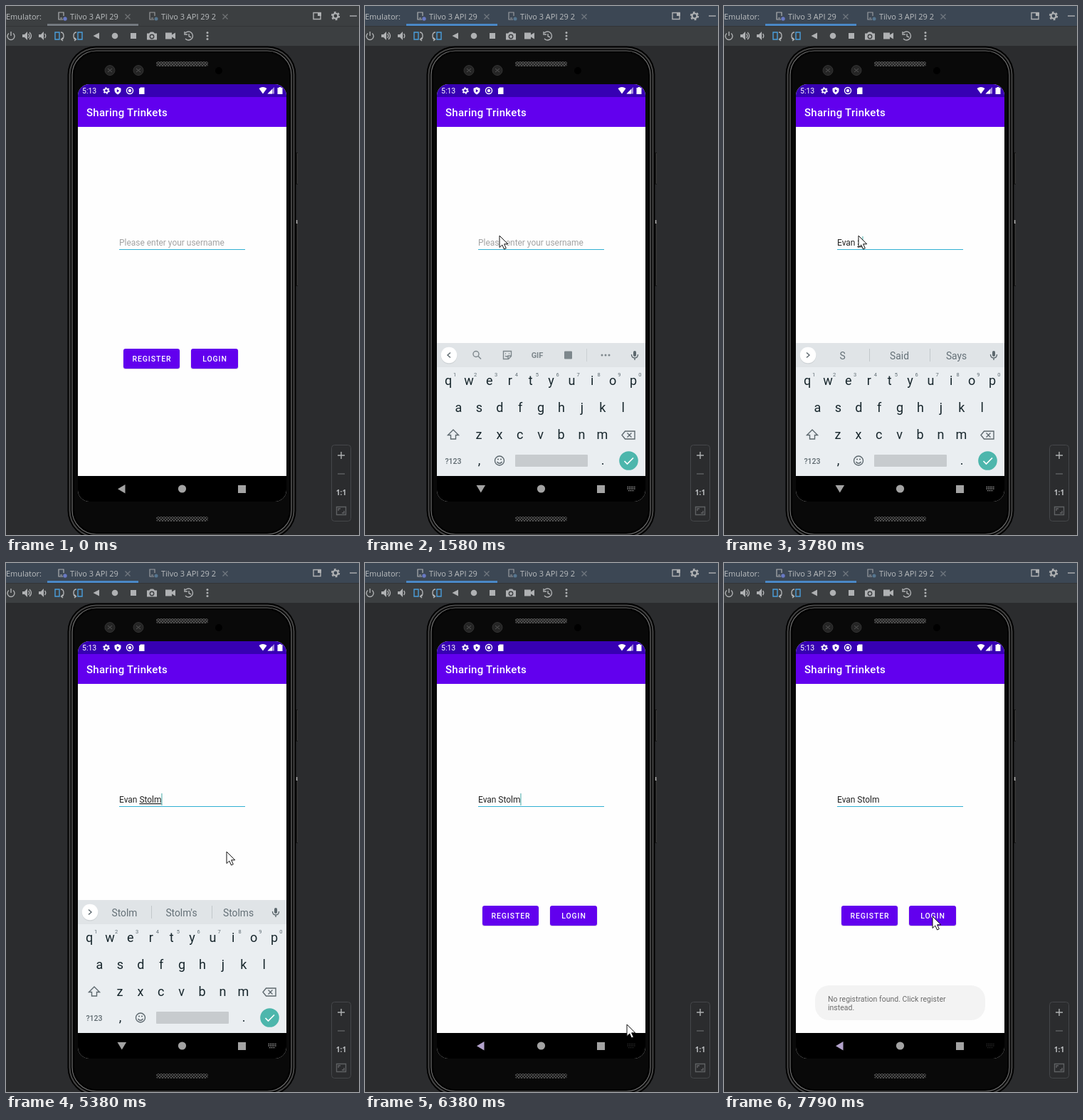
An HTML page that plays this animation: 496x744 px, repeating every 7990 ms.

```html
<!DOCTYPE html>
<html lang="en">
<head>
<meta charset="utf-8">
<title>Emulator login</title>
<style>
html, body { margin: 0; width: 100%; height: 100%; overflow: hidden; background: #2b2c2e; }
svg { display: block; width: 496px; height: 744px; font-family: Roboto, sans-serif; }
text { white-space: pre; }
.ide { font: 11px "Open Sans", sans-serif; fill: #bbbec0; }
.line { fill: none; stroke: currentColor; stroke-width: 1.4; }
.mid { text-anchor: middle; }
.button { font-size: 10.46px; font-weight: 500; letter-spacing: .93px; fill: #fff; }
.field { font-size: 11.95px; }
.key { font-size: 18px; fill: #17262c; }
.hint { font-size: 7.5px; fill: #5f6c73; }
.word { font-size: 13.8px; fill: #647077; }
</style>
</head>
<body>
<svg viewBox="0 0 496 744">
  <defs>
    <clipPath id="screen"><rect x="101" y="110" width="293" height="587" rx="16"/></clipPath>
    <pattern id="mesh" width="4" height="4" patternUnits="userSpaceOnUse">
      <path d="M0 0 4 4M4 0 0 4" stroke="#555" stroke-width=".9"/>
    </pattern>
    <g id="gear" fill="none" stroke="currentColor">
      <circle r="3.5" stroke-width="2.2"/><circle r="5.2" stroke-width="2" stroke-dasharray="2.7 2.74"/>
    </g>
    <g id="device" class="line">
      <path d="M2 5H-4V-5H3V0" stroke-width="1.2"/><path d="M-2 3H1" stroke-width="1"/>
    </g>
    <path id="close" class="line" d="M-3.5-3.5 3.5 3.5M3.5-3.5-3.5 3.5" stroke-width="1"/>
    <path id="speaker" d="M-6-2h3l4-4V6L-3 2h-3z" fill="currentColor"/>
    <g id="turn" class="line">
      <path d="M-6-5H0V5H-6Z" stroke="#4a9fdc"/><path d="M2-5Q6-5 6 0T3 5M5 2.500 2.500 5 5 7"/>
    </g>
    <g id="mic"><rect x="-2" y="-6" width="4" height="8" rx="2" fill="currentColor"/><path class="line" d="M-4.500-1Q-4.500 4 0 4T4.500-1M0 4V7"/></g>
  </defs>

  <rect width="496" height="744" fill="#2b2c2e"/>
  <rect width="496" height="56" fill="#3c3f41"/>
  <rect id="header" width="496" height="28"/>
  <path d="M0 28.500H496" stroke="#323436"/>
  <rect id="tabline" x="58" y="25" width="128" height="3"/>
  <g color="#afb1b3">
    <text class="ide" x="0" y="18.500">Emulator:</text>
    <use href="#device" x="78" y="14"/><circle cx="83" cy="18" r="2.700" fill="#6879c4"/>
    <text class="ide" x="90" y="18.500">Tilvo 3 API 29</text>
    <use href="#close" x="171" y="15" opacity=".45"/>
    <use href="#device" x="206" y="14" opacity=".8"/><circle cx="211" cy="18" r="2.500" fill="#567690"/>
    <text class="ide" x="218" y="18.500">Tilvo 3 API 29 2</text>
    <use href="#close" x="308" y="15" opacity=".45"/>
    <path class="line" d="M432 9.500h10v9h-10z"/><path d="M438 9h5v5h-5z" fill="currentColor"/>
    <use href="#gear" x="463" y="14"/>
    <path d="M483 14h10" class="line"/>

    <path class="line" d="M4 38.500A5 5 0 1 0 10 38.500M7 36V42"/>
    <use href="#speaker" x="29" y="42"/>
    <path class="line" d="M31.500 39Q34 42 31.500 45M33 37Q38 42 33 47"/>
    <use href="#speaker" x="52" y="42"/><path class="line" d="M54.500 39Q57 42 54.500 45"/>
    <use href="#turn" x="75" y="42"/>
    <use href="#turn" transform="translate(101 42) scale(-1 1)"/>
    <path d="M131 37.500V46.500L122.500 42Z" fill="currentColor"/>
    <circle cx="153" cy="42" r="4.300" fill="currentColor"/>
    <path d="M175 38h8v8h-8z" fill="currentColor"/>
    <path d="M198 38.500h3l2-2h4l2 2h3v9h-14z" fill="currentColor"/>
    <circle cx="205" cy="43" r="2.700" fill="none" stroke="#3c3f41" stroke-width="1.400"/>
    <path d="M224 37.500h9v3l5-3v9l-5-3v3h-9z" fill="currentColor"/>
    <path class="line" d="M252 38A6 6 0 1 1 252 46M251 36V40H255M257 39V42.500L260 44"/>
    <g fill="currentColor"><circle cx="283" cy="37.500" r="1.500"/><circle cx="283" cy="42" r="1.500"/><circle cx="283" cy="46.500" r="1.500"/></g>

    <rect x="457.500" y="617.500" width="27" height="107" rx="4" fill="#2b2c2e" stroke="#45474a"/>
    <path class="line" stroke-width="2" d="M466 632h10M471 627v10"/>
    <path class="line" d="M466 658h10" opacity=".4"/>
    <text class="ide mid" x="471" y="688" style="font-weight:700;font-size:10px">1:1</text>
    <path class="line" opacity=".4" d="M464.500 704.500h13v11h-13zM467 710v-3h3M475 710v3h-3"/>
  </g>

  <path d="M408.500 206V251M408.500 301V394" stroke="#161616" stroke-width="3"/>
  <path d="M409.500 207V250M409.500 305V393" stroke="#3c3c3c"/>
  <path d="M408.500 301V306" stroke="#aaa" stroke-width="2"/>
  <rect x="86.500" y="56.500" width="321" height="693" rx="40" fill="#000"/>
  <rect x="88.500" y="58.500" width="317" height="689" rx="38" fill="#454545"/>
  <rect x="90.500" y="60.500" width="313" height="685" rx="36" fill="#050505"/>
  <rect x="93" y="63" width="308" height="680" rx="34" fill="#090909" stroke="#6c6c6c" stroke-width="1.200"/>
  <rect x="95" y="65" width="304" height="676" rx="32" fill="#090909" stroke="#000" stroke-width="2"/>
  <rect x="211" y="78" width="73" height="7" rx="3" fill="#222"/>
  <rect x="211" y="78" width="73" height="7" rx="3" fill="url(#mesh)"/>
  <rect x="211" y="718" width="73" height="7" rx="3" fill="#151515"/>
  <rect x="211" y="718" width="73" height="7" rx="3" fill="url(#mesh)"/>
  <g fill="#252525" stroke="#333"><circle cx="146" cy="90.500" r="7"/><circle cx="186" cy="90.500" r="7"/></g>
  <path d="M143 88l6 5M149 88l-6 5M183 88l6 5M189 88l-6 5" stroke="#555"/>
  <circle cx="299" cy="91" r="5" fill="#000"/>

  <g clip-path="url(#screen)">
    <rect x="101" y="110" width="293" height="587" fill="#fefefe"/>
    <rect x="101" y="110" width="293" height="18" fill="#3700b3"/>
    <rect x="101" y="128" width="293" height="42" fill="#6200ee"/>
    <g fill="#fff" color="#fff">
      <text x="107" y="123" font-size="10.500">5:13</text>
      <use href="#gear" transform="translate(141 119) scale(.78)"/>
      <path d="M157 114l4.500 1.700v3Q161.500 122 157 124.500Q152.500 122 152.500 118.700v-3z"/>
      <path d="M155.800 117v4.400l3.400-2.200z" fill="#3700b3"/>
      <circle cx="174" cy="119" r="4.500" class="line" stroke-width="1.200"/><circle cx="174" cy="119" r="2.200"/>
      <path d="M189 114.500h5.500v9.500H187v-7.500z"/>
      <path d="M355.500 116Q361 112 366.500 116L361 123.500Z"/>
      <path d="M377 114v9.500h-9.500z" fill-opacity=".55"/><path d="M374 117v6.500h-6.500z"/>
      <path d="M383.500 114h3v1h2v9h-7v-9h2z"/>
      <text x="113" y="155" font-size="14.950" font-weight="500" letter-spacing=".32">Sharing Trinkets</text>
    </g>
    <text id="placeholder" class="field" x="159" y="337" fill="#a2a2a2">Please enter your username</text>
    <text class="field" x="159" y="337" fill="#212121" id="entry"><tspan id="done"></tspan><tspan id="composing" text-decoration="underline"></tspan></text>
    <rect x="159" y="342" width="177" height="1" fill="#30afd3"/>
    <rect id="caret" y="324" width="1" height="17" fill="#45aaa8"/>

    <g fill="#dcd8e4">
      <rect x="164.500" y="483" width="80" height="28" rx="3"/>
      <rect x="259.500" y="483" width="67" height="28" rx="3"/>
    </g>
    <rect x="165" y="482" width="79" height="28" rx="3" fill="#6200ee"/>
    <rect id="login" x="260" y="482" width="66" height="28" rx="3"/>
    <text class="button mid" x="205" y="500">REGISTER</text>
    <text class="button mid" x="293.500" y="500">LOGIN</text>

    <g id="toast">
      <rect x="128" y="594" width="239" height="49" rx="20" fill="#f3f3f3"/>
      <g id="message" font-size="10.460" letter-spacing=".03" fill="#4c4c4c">
        <text x="146" y="617">No registration found. Click register</text>
        <text x="146" y="629">instead.</text>
      </g>
    </g>

    <rect x="101" y="661" width="293" height="36"/>
    <g fill="#a3a3a3">
      <path id="back" d="M157 679.300 167.500 673V685.600Z"/>
      <circle cx="247.500" cy="679" r="5.600"/>
      <path d="M326 674h11v11h-11z"/>
    </g>

    <g id="keyboard" color="#5d686e">
      <rect x="101" y="474" width="293" height="187" fill="#eaeef1"/>
      <rect x="101" y="474" width="293" height="34" fill="#e0e4e7"/>
      <circle cx="118" cy="492" r="11.500" fill="#cfd4d7"/><circle cx="118" cy="491" r="11.300" fill="#fff"/>
      <path id="chevron" class="line" d="M116 487.500l4 3.500-4 3.500"/>
      <use href="#mic" x="379" y="491"/>
      <g id="tools" opacity=".75">
        <circle cx="156" cy="489.500" r="4" class="line"/><path class="line" d="M159 492.500l4 4"/>
        <path class="line" d="M194.500 485.500h11v7l-4 4h-7zM205 492h-4v4M197 489h1M202 489h1M197 492q2 2 4 0"/>
        <text class="mid" x="242" y="495" font-size="11" font-weight="700" fill="currentColor">GIF</text>
        <rect x="280" y="485.500" width="11" height="11" rx="1" fill="currentColor"/>
        <path d="M311.500 482v18" stroke="#c5cacd"/>
        <g fill="currentColor"><circle cx="333" cy="491" r="1.500"/><circle cx="338" cy="491" r="1.500"/><circle cx="343" cy="491" r="1.500"/></g>
      </g>
      <g id="words" class="word mid">
        <text x="166.500" y="497"></text><text x="246.500" y="497"></text><text x="326.500" y="497"></text>
        <path d="M204.500 482v18M289.500 482v18" stroke="#c3c8cb"/>
      </g>
      <g id="keys" class="mid"></g>
      <path class="line" d="M124 596l7.500 7.500h-4v5.500h-7v-5.500h-4z"/>
      <path class="line" d="M361 603.500l4.500-5.500H379v11H365.500zM368.500 600.500l6 6M374.500 600.500l-6 6"/>
      <text class="mid" x="124" y="643.500" font-size="10.500" font-weight="500" fill="#5d686e">?123</text>
      <circle class="line" cx="189" cy="639.500" r="6.500"/>
      <path class="line" d="M185.500 641Q189 645.500 192.500 641M186 637.500h2M190 637.500h2"/>
      <rect x="211" y="631" width="102" height="17" rx="1" fill="#c7cbce"/>
      <circle cx="370.500" cy="639.500" r="13.300" fill="#4db6ac"/>
      <path d="M364.500 640l4 4 8.500-8.500" fill="none" stroke="#fff" stroke-width="1.700"/>
    </g>
    <path id="switcher" d="M368.500 676.500h11M368.500 679h11M370 681.700h8" stroke="#9a9a9a" stroke-width="1.300" stroke-dasharray="1.400 1"/>
  </g>
  <path id="pointer" d="M0 0V16.500L3.800 13 6.500 19 9.300 17.700 6.600 11.800H11.700Z" fill="#fff" stroke="#111"/>
</svg>
<script>
const LOOP = 7990;
const $ = id => document.getElementById(id);
const show = (id, on) => $(id).style.display = on ? '' : 'none';

// Letter keys: [letters, first centre, baseline]
const label = (x, y, text, cls) => `<text x="${x}" y="${y}" class="${cls}">${text}</text>`;
const rows = [['qwertyuiop', 117, 533], ['asdfghjkl', 131.500, 570.500], ['zxcvbnm', 160, 608.500]];
$('keys').innerHTML = rows.map(([letters, x, y], row) => [...letters].map((c, i) =>
  label(x + 28.9 * i, y, c, 'key') +
  (row ? '' : label(x + 9.200 + 28.9 * i, 521, (i + 1) % 10, 'hint'))).join('')).join('')
  + label(160.500, 645, ',', 'key') + label(334, 645, '.', 'key');

// Each step changes only the listed properties. keyboard: [drop, opacity]
const start = {
  focus: false, pointer: null, caret: false, done: '', composing: '', words: null,
  keyboard: null, back: 0, toast: 0, message: 0, pressed: false, after: false
};
const steps = [
  [390, { pointer: [231, 379] }],
  [590, { pointer: [189, 323] }],
  [790, { focus: true, caret: true }],
  [990, { keyboard: [34, .6], back: -25 }],
  [1190, { keyboard: [0, 1], back: -90 }],
  [1580, { caret: false }],
  [1980, { caret: true, composing: 'E' }],
  [2180, { words: ['E', 'Even', 'Ever'] }],
  [2580, { composing: 'Ev', words: ['Ev', 'Evan', 'Eve'] }],
  [2980, { composing: 'Eva', words: ['Eva', 'Evan', 'Evade'] }],
  [3180, { composing: 'Evan', words: ['Evan', "Evan's", 'Evans'] }],
  [3580, { done: 'Evan ', composing: '', words: ['and', 'is', 'was'] }],
  [3780, { composing: 'S', words: ['S', 'Said', 'Says'] }],
  [4180, { composing: 'Stol', words: ['Stol', 'Stole', 'Stolen'] }],
  [4380, { composing: 'Stolm', words: ['Stolm', "Stolm's", 'Stolms'] }],
  [4980, { pointer: [214, 340], caret: false }],
  [5180, { pointer: [268, 376] }],
  [5380, { pointer: [310, 406], caret: true }],
  [5580, { pointer: [372, 520] }],
  [5780, { pointer: [390, 625] }],
  [5980, { pointer: [368, 649], caret: false }],
  [6180, { done: 'Evan Stolm', composing: '', keyboard: [34, .5], back: -30 }],
  [6380, { keyboard: null, back: 0, after: true, caret: true }],
  [6580, { pointer: [300, 570] }],
  [6780, { pointer: [237, 503] }],
  [6980, { pointer: [293, 497], caret: false }],
  [7180, { toast: 1, message: .15, pressed: true }],
  [7380, { message: .4, pressed: false, caret: true }],
  [7580, { message: .65 }],
  [7790, { message: .82, caret: false }]
];

function render(s) {
  $('header').setAttribute('fill', s.focus ? '#3c4754' : '#3c3f41');
  $('tabline').setAttribute('fill', s.focus ? '#4a88c7' : '#747a80');

  show('placeholder', !s.done && !s.composing);
  $('done').textContent = s.done;
  $('composing').textContent = s.composing;
  show('caret', s.caret);
  $('caret').setAttribute('x', 159 + (s.done || s.composing ? $('entry').getComputedTextLength() : 0));

  show('keyboard', s.keyboard);
  if (s.keyboard) {
    $('keyboard').setAttribute('transform', `translate(0 ${s.keyboard[0]})`);
    $('keyboard').setAttribute('opacity', s.keyboard[1]);
  }
  show('tools', !s.words);
  show('words', s.words);
  if (s.words) document.querySelectorAll('#words text').forEach((t, i) => t.textContent = s.words[i]);
  $('chevron').setAttribute('transform', s.words ? '' : 'rotate(180 118 491)');

  $('back').setAttribute('transform', `rotate(${s.back} 162.500 679)`);
  $('back').setAttribute('fill', s.after ? '#b3a3cc' : '#a3a3a3');
  show('switcher', s.keyboard || s.after);
  $('switcher').setAttribute('opacity', s.after ? .25 : 1);

  $('login').setAttribute('fill', s.pressed ? '#7a2bf0' : '#6200ee');
  $('toast').setAttribute('opacity', s.toast);
  $('message').setAttribute('opacity', s.message);
  show('pointer', s.pointer);
  if (s.pointer) $('pointer').setAttribute('transform', `translate(${s.pointer})`);
}

let shown = -1;
function tick() {
  const time = performance.now() % LOOP;
  const passed = steps.filter(([at]) => at <= time);
  if (passed.length !== shown) {
    shown = passed.length;
    render(Object.assign({}, start, ...passed.map(([, change]) => change)));
  }
  requestAnimationFrame(tick);
}
tick();
</script>
</body>
</html>
```
